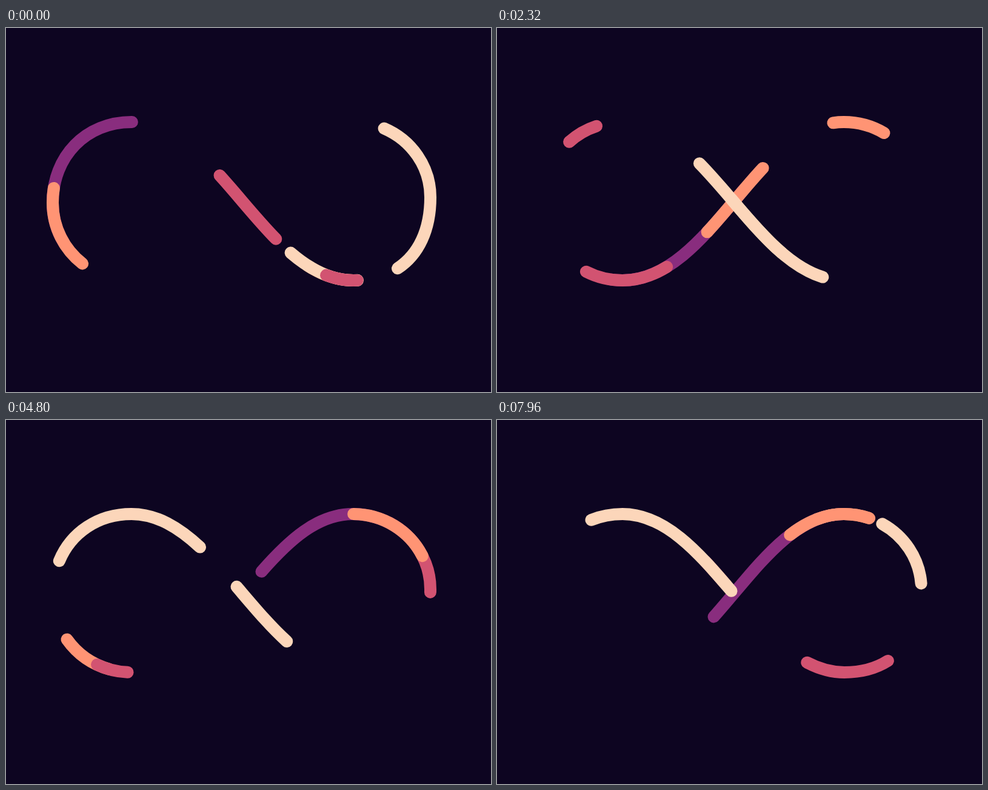
Write an HTML page that moves like this. It is 800 by 600 pixels and loops after 8 s.

```html
<!DOCTYPE html>
<html lang="en">
<head>
<meta charset="utf-8">
<title>Infinity ribbons</title>
<style>
  html, body {
    margin: 0;
    width: 100%;
    height: 100%;
    overflow: hidden;
    background: #0d0521;
  }
  svg { display: block; width: 100%; height: 100%; }

  /* The track is 1000 units long; a full cycle takes 14.96 s, of which 8 s play. */
  use {
    fill: none;
    stroke: var(--color);
    stroke-width: 20px;
    stroke-linecap: round;
    stroke-dasharray: calc(1px * var(--len)) calc(1px * (1000 - var(--len)));
    animation: travel 8s steps(200) -4ms infinite;
  }
  @keyframes travel {
    from { stroke-dashoffset: calc(-1px * var(--at)); }
    to { stroke-dashoffset: calc(-1px * (var(--at) + var(--laps) * 534.759)); }
  }
  .purple { --color: #892d7e; }
  .pink { --color: #d25371; }
  .orange { --color: #ff9474; }
  .peach { --color: #fcd6ba; }
</style>
</head>
<body>
<svg viewBox="0 0 800 600">
  <defs>
    <path id="track" pathLength="1000" d="M207 155
      C350 155 429 416 573 416
      C652 416 700 363.5 700 279
      C700 210.5 642.7 155 572 155
      C429 155 354 416 207 416
      C135 416 77 359 77 288
      C77 211.4 132 155 207 155 Z"/>
  </defs>
  <use href="#track" class="purple" style="--at:840.5; --len:160; --laps:5"/>
  <use href="#track" class="pink" style="--at:100.3; --len:80; --laps:4"/>
  <use href="#track" class="orange" style="--at:814.8; --len:80; --laps:5"/>
  <use href="#track" class="orange" style="--at:219.2; --len:50; --laps:8"/>
  <use href="#track" class="peach" style="--at:199.4; --len:70; --laps:6"/>
  <use href="#track" class="pink" style="--at:239.2; --len:30; --laps:11"/>
  <use href="#track" class="peach" style="--at:309.4; --len:160; --laps:5"/>
</svg>
</body>
</html>
```
